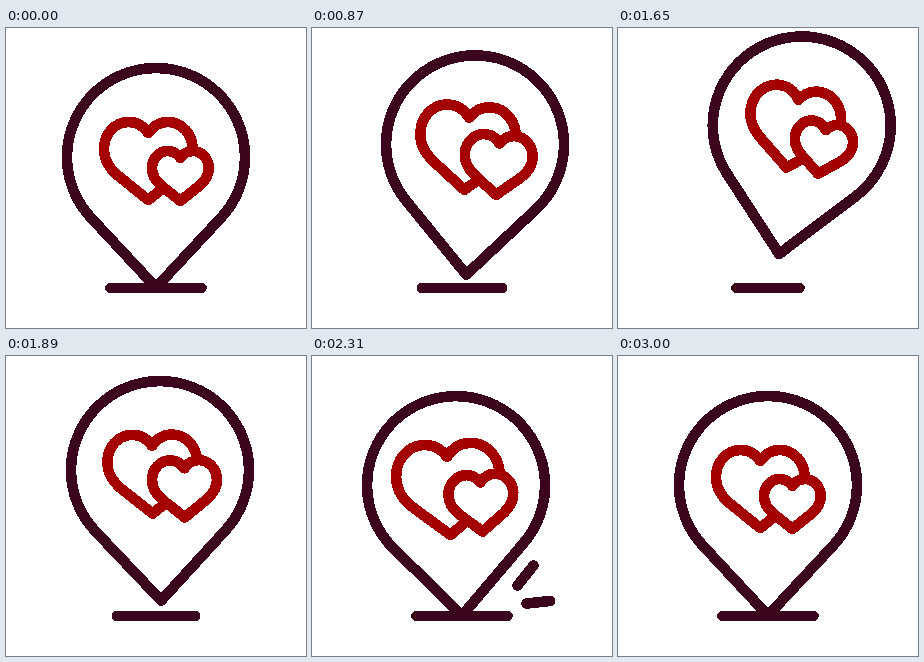
These frames come from a looping animation (300x300 px, 3.6 s). An HTML page:

```html
<!DOCTYPE html>
<html lang="en">
<head>
<meta charset="utf-8">
<title>Love pin</title>
<style>
  html, body { margin: 0; width: 100%; height: 100%; overflow: hidden; background: #fff; }
  svg { display: block; width: 100%; height: 100%; }
  path { fill: none; stroke: #3c051e; stroke-width: 10.6; stroke-linecap: round; stroke-linejoin: round; }
  .heart { fill: #fff; stroke: #a40000; }
</style>
</head>
<body>
<svg viewBox="0 0 300 300" shape-rendering="crispEdges">
  <path id="base"/>
  <path id="spark0"/>
  <path id="spark1"/>
  <g id="pin">
    <path d="M150 259.5 L84.9 189.7 A89 89 0 1 1 215.1 189.7 Z"/>
    <path class="heart" id="big" transform="translate(142.3 133)"/>
    <path class="heart" id="small" transform="translate(174.4 148)"/>
  </g>
</svg>
<script>
const LOOP = 3600;
const PIVOT = [150, 257.3];
const $ = id => document.getElementById(id);

// Tracks are [time, value] pairs, eased between neighbours.
const lift   = [[300, 0], [1650, 1], [2100, 0]];
const tilt   = [[300, 0], [1650, 10], [2100, -9], [2550, 5], [3000, 0]];
const beatS  = [[300, 1], [900, 1.2], [1500, 1], [2100, 1.2], [2700, 1]];
const beatB  = [[600, 1], [1200, 1.18], [1800, 1], [2400, 1.18], [3000, 1]];
const head   = [[2100, 0], [2310, 1]];
const tail   = [[2310, 0], [2520, 1]];
const sparks = [[205.5, 229.5, 221.5, 209.5], [214.5, 247.5, 238, 245]];

const smooth = u => u * u * (3 - 2 * u);
const mix = (a, b, u) => a + (b - a) * u;

function at(track, t) {
  if (t <= track[0][0]) return track[0][1];
  for (let i = 1; i < track.length; i++) {
    const [t0, a] = track[i - 1], [t1, b] = track[i];
    if (t < t1) return mix(a, b, smooth((t - t0) / (t1 - t0)));
  }
  return track[track.length - 1][1];
}

// Heart outline centred on the origin; k sizes the shape, not the line.
function heart(k) {
  const p = (x, y) => `${x * k} ${y * k} `;
  return 'M' + p(0, -28) +
    'C' + p(-5.5, -36) + p(-12.5, -39) + p(-19.5, -39) +
    'C' + p(-33.5, -39) + p(-44.3, -27) + p(-44.3, -12) +
    'C' + p(-44.3, 0) + p(-38.5, 7.5) + p(-30.5, 14.5) +
    'L' + p(0, 39) + 'L' + p(30.5, 14.5) +
    'C' + p(38.5, 7.5) + p(44.3, 0) + p(44.3, -12) +
    'C' + p(44.3, -27) + p(33.5, -39) + p(19.5, -39) +
    'C' + p(12.5, -39) + p(5.5, -36) + p(0, -28) + 'Z';
}

function draw(t) {
  const up = at(lift, t);
  const half = 45.5 - 14 * up;
  $('base').setAttribute('d', `M${150 - half} 260H${150 + half}`);
  $('pin').setAttribute('transform',
    `translate(${11.5 * up} ${-33.5 * up}) rotate(${at(tilt, t)} ${PIVOT})`);
  $('big').setAttribute('d', heart(at(beatB, t)));
  $('small').setAttribute('d', heart(0.64 * at(beatS, t)));

  const h = at(head, t), e = at(tail, t);
  sparks.forEach(([x0, y0, x1, y1], i) => {
    const s = $('spark' + i);
    s.style.display = h > e ? '' : 'none';
    s.setAttribute('d', `M${mix(x0, x1, e)} ${mix(y0, y1, e)}L${mix(x0, x1, h)} ${mix(y0, y1, h)}`);
  });
}

const start = performance.now();
function frame() {
  draw((performance.now() - start) % LOOP);
  requestAnimationFrame(frame);
}
frame();
</script>
</body>
</html>
```
